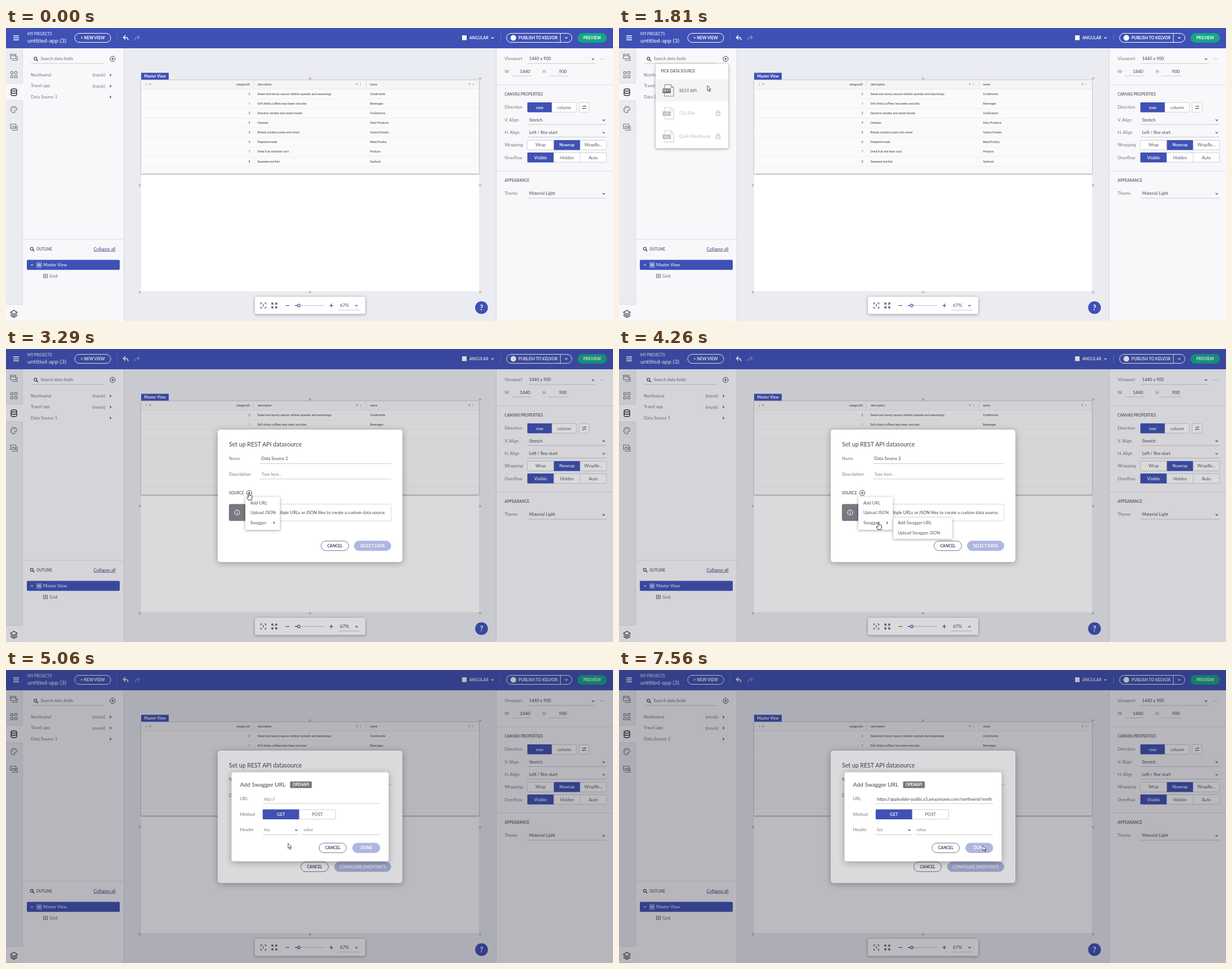
An HTML page that plays this animation: 1078x520 px, repeating every 8 s.

```html
<!DOCTYPE html>
<html lang="en">
<head>
<meta charset="utf-8">
<title>App builder: add a data source</title>
<style>
html, body { margin: 0; width: 100%; height: 100%; overflow: hidden; }
svg { display: block; width: 100%; height: 100%; font-family: Lato, "Open Sans", sans-serif; }
text { white-space: pre; }
.grid { font-family: Roboto, sans-serif; }
.shadow { filter: drop-shadow(0 1px 2.5px rgba(0,0,0,.38)); }
.lift { filter: drop-shadow(0 2px 6px rgba(0,0,0,.3)); }
</style>
</head>
<body>
<svg id="stage" viewBox="0 0 1078 520" preserveAspectRatio="none"></svg>
<script>
const BLUE = '#3f51b5', PALE = '#aeb6e0', INK = '#44454f', GREY = '#77777c', PANEL = '#f8f8fb', EDGE = '#d6d7dc';

// y is the vertical middle of the capitals
const text = (x, y, s, o = {}) => {
  const size = o.size || 7.65;
  return `<text x="${x}" y="${y + size * .36}" font-size="${size}" fill="${o.fill || INK}" font-weight="${o.w || 400}"` +
    ` text-anchor="${o.at || 'start'}"${o.it ? ' font-style="italic"' : ''}${o.more || ''}>${s}</text>`;
};
const box = (x, y, x2, y2, fill, more = '') =>
  `<rect x="${x}" y="${y}" width="${x2 - x}" height="${y2 - y}" fill="${fill}" ${more}/>`;
const path = (d, color = GREY, w = 1, fill = 'none') =>
  `<path d="${d}" fill="${fill}" stroke="${color}" stroke-width="${w}"/>`;
const rule = (x, x2, y, color = '#bdbec5') => path(`M${x} ${y}H${x2}`, color, .8);
const dot = (x, y, r, fill, more = '') => `<circle cx="${x}" cy="${y}" r="${r}" fill="${fill}" ${more}/>`;
const at = (x, y, s) => `<g transform="translate(${x} ${y})">${s}</g>`;
const group = (id, s, more = '') => `<g id="${id}" ${more}>${s}</g>`;
const down = (x, y, c = INK) => path(`M${x - 2} ${y - 1}l2 2 2-2`, c, 1.1);
const right = (x, y, c = INK) => path(`M${x - 1} ${y - 2}l2 2-2 2`, c, 1.1);
const bold = (x, y, s, fill = '#6b6c74', size = 6.7, anchor) => text(x, y, s, { w: 700, fill, size, at: anchor });
const plus = (x, y) => dot(x, y, 4.6, 'none', `stroke="${INK}"`) + path(`M${x - 2.5} ${y}h5M${x} ${y - 2.5}v5`, INK);
const lens = (x, y) => dot(x - .7, y - .7, 2.5, 'none', `stroke="${INK}" stroke-width="1.2"`) +
  path(`M${x + 1.2} ${y + 1.2}l2.6 2.6`, INK, 1.5);
const pill = (x, x2, y, label, solid, h = 17) =>
  box(x, y - h / 2, x2, y + h / 2, solid || '#fff', `rx="${h / 2}" stroke="${solid || '#75767f'}"`) +
  bold((x + x2) / 2, y, label, solid ? '#fff' : '#3c4170', 7, 'middle');
const field = (x, x2, y, hint) => text(x + 2.5, y, hint, { it: 1, fill: '#85868c' }) + rule(x, x2, y + 8.7);

// equal buttons with one chosen
const choice = (x, x2, y, h, labels, chosen) => {
  const w = (x2 - x) / labels.length;
  return box(x, y - h / 2, x2, y + h / 2, '#fff', 'rx="1.5" stroke="#c4c5cd" stroke-width=".8"') +
    labels.map((s, i) => {
      const l = x + w * i, on = i === chosen;
      return (on ? box(l, y - h / 2 - .3, l + w, y + h / 2 + .3, BLUE, 'rx="1"') : '') +
        (i ? path(`M${l} ${y - h / 2}v${h}`, '#c4c5cd', .7) : '') +
        text(l + w / 2, y, s, { at: 'middle', fill: on ? '#fff' : '#5a5b63', w: on ? 600 : 400 });
    }).join('');
};

const header = () => box(0, 0, 1078, 36, BLUE) +
  path('M13 14h10M13 17.5h10M13 21h10', '#fff', 1.3) +
  bold(38, 10.3, 'MY PROJECTS', '#cdd2f0', 6.6) +
  text(38, 22, 'untitled-app (3)', { size: 10.2, fill: '#fff' }) +
  box(122, 9.5, 186, 25.5, 'none', 'rx="8" stroke="#fff"') + bold(154, 17.3, '+ NEW VIEW', '#fff', 7.2, 'middle') +
  path('M197.5 9v16M878.5 9v16', '#6372c4') +
  path('M212 13l-3.5 3.7 3.5 3.7M208.8 16.7h4.5q3.2.5 3.5 5', '#fff', 1.5) +
  path('M233.500 13l3.500 3.700-3.500 3.700M236.700 16.700h-4.500q-3.200.5-3.500 5', '#8490d3', 1.3) +
  box(810, 13, 818, 21.5, '#fff') + text(823, 17.3, 'ANGULAR', { size: 7.1, fill: '#fff', w: 600 }) + down(864, 17.5, '#fff') +
  box(889, 9.5, 1005, 25.5, 'none', 'rx="8" stroke="#fff"') + path('M984.500 10v15.500', '#fff', .9) +
  dot(901, 17.5, 5, '#fff') + bold(910, 17.3, 'PUBLISH TO KELVOR', '#fff', 7.1) + down(995, 17.5, '#fff') +
  box(1015, 9, 1067, 26, '#13a784', 'rx="8.500"') + bold(1041, 17.3, 'PREVIEW', '#fff', 7.1, 'middle');

const rail = () => box(0, 36, 29, 520, '#ebecf1') + path('M29.300 36V520', EDGE) +
  [[98, 129], [490.500, 520]].map(([a, b]) => box(0, a, 30, b, PANEL) + rule(0, 29, a, EDGE) + rule(0, 29, b, EDGE)).join('') +
  at(14, 52, path('M-6-5.500H3.500V2.500H-6ZM-6-2.800H3.500M5.800-2V5.500H-3.500', GREY, 1.2)) +
  at(14, 83, path('M-5.500-5.500h4v4h-4zM-5.500 1.500h4v4h-4zM1.500 1.500h4v4h-4z', GREY, 1.2) + dot(3.5, -3.5, 2.3, 'none', `stroke="${GREY}" stroke-width="1.2"`)) +
  at(14, 114, path('M-5-4V4Q-5 6 0 6T5 4V-4M-5-4Q-5-6 0-6T5-4Q5-2 0-2T-5-4M-5 0Q-4 2 0 2T5 0', '#24252b', 1.3)) +
  at(14, 145, path('M1 5.500A5.600 5.600 0 1 1 5.600-1Q5.500 1.500 2.500 1Q0 1 1.500 3Q2 5 1 5.500Z', GREY, 1.2) +
    [[-3, -.5], [-1.500, -3], [1.500, -3]].map(p => dot(...p, .8, GREY)).join('')) +
  at(14, 176, path('M-6-5.500H3.500V2.500H-6ZM5.800-3V5.500H-3.500M-4 1l2-3 2 2 1-1 2 2', GREY, 1.2)) +
  at(14, 507, path('M-6-2.500L0-6 6-2.500 0 1ZM-6 .5L0 4 6 .5M-6 3.300L0 6.800 6 3.300', '#33343b', 1.2));

const source = (y, name, mock) => text(44, y, name, { fill: '#74757b' }) +
  (mock ? text(176, y + .5, '(mock)', { at: 'end', fill: '#74757b', more: mock }) : '') + right(185.5, y + .5);

const bars = (x, y, c) => [0, 1, 2].map(i =>
  box(x + i * 3, y, x + i * 3 + 2, y + 7.500, c)).join('') + path(`M${x} ${y + 2.500}h8M${x} ${y + 5}h8`, PANEL, .5);

const panel = () => box(30, 36, 209, 520, PANEL) + path('M209.500 36V520', EDGE) +
  lens(53, 55) + text(61.500, 54.500, 'Search data fields', { it: 1, fill: '#75767c', size: 7.9 }) + rule(44, 174, 63) + plus(189.300, 54.700) +
  group('rowHover', box(40, 93.500, 193, 111, '#ededf0') +
    text(137, 103, '(mock)', { fill: '#74757b' }) + [166, 169, 172].map(x => dot(x, 103, 1.100, INK)).join('')) +
  source(83, 'Northwind', ' ') + source(102.500, 'Travel app', ' id="mock"') + source(122, 'Data Source 1') +
  rule(30, 209, 375, EDGE) + lens(46.500, 392.500) + bold(54, 392.500, 'OUTLINE', '#6b6c74', 6.5) +
  text(194.500, 392, 'Collapse all', { at: 'end', size: 7.9, fill: '#3a4478', more: ' text-decoration="underline"' }) +
  box(37, 411.500, 202, 429.300, BLUE, 'rx="2"') + down(46, 420.500, '#c6ccef') +
  box(54.500, 416, 63, 425, 'none', 'stroke="#aab3e6" stroke-width=".7"') + path('M56.500 417.500v6M58.800 417.500v6M61 417.500v6', '#fff', 1.200) +
  text(66, 420.500, 'Master View', { fill: '#fff' }) +
  bars(66, 436.300, '#85868c') + text(77, 440, 'Grid', { fill: '#5f6067' });

const rows = [
  [2, 'Sweet and savory sauces relishes spreads and seasonings', 'Condiments'],
  [1, 'Soft drinks coffees teas beers and ales', 'Beverages'],
  [3, 'Desserts candies and sweet breads', 'Confections'],
  [4, 'Cheeses', 'Dairy Products'],
  [5, 'Breads crackers pasta and cereal', 'Grains/Cereals'],
  [6, 'Prepared meals', 'Meat/Poultry'],
  [7, 'Dried fruit and bean curd', 'Produce'],
  [8, 'Seaweed and fish', 'Seafood']];
const cell = (x, y, s, anchor) => text(x, y, s, { size: 5.050, at: anchor, fill: '#3c3c40' });
const dots = x => [-1.600, 0, 1.600].map(d => dot(x, 100 + d, .5, GREY)).join('');
const arrowUp = x => path(`M${x} 102v-4M${x - 1.800} 99.800l1.800-1.800 1.800 1.800`, GREY, .6);

const canvas = () => box(210, 36, 870, 520, '#ebecf1') + box(240, 92, 840, 467, '#fff') +
  box(240, 92, 840, 258.500, '#fafafa', 'style="filter:drop-shadow(0 1px 1px rgba(0,0,0,.45))"') +
  box(240, 92, 840, 108.500, '#f5f5f6') +
  `<g class="grid">` + cell(433, 100.300, 'categoryID', 'end') + cell(447, 100.300, 'description') + cell(646.500, 100.300, 'name') +
  rows.map(([id, about, name], i) => {
    const y = 117.200 + i * 17.070;
    return cell(433.500, y, id, 'end') + cell(446.500, y, about) + cell(646.500, y, name) + rule(240, 840, y + 8.500, '#eeeeef');
  }).join('') + `</g>` + path('M439.500 92v16.500M639.500 92v16.500', '#dcdcdf', .8) + rule(240, 840, 108.500, '#e6e6e8') +
  dots(249.500) + arrowUp(256) + arrowUp(623) + dots(629.500) + arrowUp(823) + dots(829.500) +
  box(240, 79.500, 289, 92, BLUE) + bold(264.500, 85.700, 'Master View', '#fff', 6.900, 'middle') + rule(240, 840, 92, '#b9bfdf') +
  [[540, 89.500], [842, 89.500], [237.500, 279], [842, 279], [237.500, 469], [540, 469], [842, 469]].map(([x, y]) =>
    box(x - 1.200, y - 1.200, x + 1.200, y + 1.200, '#fff', 'stroke="#80818a" stroke-width=".7"')).join('') +
  box(442, 477, 638, 507.500, '#fff', 'rx="3" class="shadow"') +
  at(457, 492.500, path('M-4.500-2V-4.500H-2M2-4.500H4.500V-2M4.500 2V4.500H2M-2 4.500H-4.500V2M0-2V2M-1-1.200L0-2', INK, 1.100)) +
  at(476.500, 492.500, path('M-4.500-1.500V-4.500H-1.500M1.500-4.500H4.500V-1.500M4.500 1.500V4.500H1.500M-1.500 4.500H-4.500V1.500M-4-4l2.500 2.500M4-4L1.500-1.500M4 4L1.500 1.500M-4 4l2.500-2.500', INK, 1.100)) +
  path('M496.500 492.500h6.500M574.500 492.500h6.500M577.700 489.300v6.500', INK, 1.200) +
  path('M520 492.500h45', '#bfc1ca') + path('M513 492.500h6', BLUE, 1.400) + dot(520, 492.500, 2.300, '#fff', `stroke="${BLUE}" stroke-width="1.200"`) +
  text(593, 492.500, '67%', { size: 8.300 }) + down(622.500, 492.700) + rule(590, 628, 500.500) +
  dot(844.500, 496.300, 11.300, BLUE) + bold(844.500, 496.500, '?', '#fff', 13, 'middle');

const label = (y, s) => text(885.500, y, s, { fill: GREY });
const select = (y, name, s, x2 = 1066.500) => label(y, name) + text(929, y, s) + rule(926, x2, y + 8.300) + down(x2 - 5, y + .5);

const inspector = () => box(870, 36, 1078, 520, PANEL) + path('M870.500 36V520', EDGE) +
  select(54.700, 'Viewport', '1440 x 900', 1047.500) + [1056.500, 1059.500, 1062.500].map(x => dot(x, 55, .8, '#a9aab0')).join('') +
  label(77, 'W') + text(931, 77, '1440', { at: 'end', size: 8 }) + rule(899, 933, 85) +
  text(953, 77, 'H', { fill: GREY }) + text(996, 77, '900', { at: 'end', size: 8 }) + rule(963, 999, 85) +
  rule(871, 1078, 100.800, EDGE) + bold(885.500, 117.300, 'CANVAS PROPERTIES') +
  label(140.500, 'Direction') + choice(926, 1013, 140.800, 17, ['row', 'column'], 0) +
  box(1018, 132.300, 1035.500, 149.300, '#fff', 'rx="1.500" stroke="#c4c5cd" stroke-width=".8"') +
  path('M1023.500 139h6.500l-1.800-1.800M1030.500 142.500h-6.500l1.800 1.800', INK) +
  select(163, 'V. Align', 'Stretch') + select(185.300, 'H. Align', 'Left / flex-start') +
  label(207.500, 'Wrapping') + choice(926, 1066.500, 207.700, 17, ['Wrap', 'Nowrap', 'WrapRe...'], 1) +
  label(230, 'Overflow') + choice(926, 1066.500, 229.800, 17, ['Visible', 'Hidden', 'Auto'], 0) +
  rule(871, 1078, 253.700, EDGE) + bold(885.500, 271, 'APPEARANCE') + select(293.700, 'Theme', 'Material Light');

const fileItem = (y, tag, name, locked) => `<g opacity="${locked ? .42 : 1}">` + at(88, y,
  path('M-7-3.500V-10.500H4L9-5.500V10H-7V5.500M4-10.500V-5.500H9', '#85868c', 1) + box(-10.500, -3.500, 4, 4.500, '#62636b') +
  bold(-3.300, .5, tag, '#fff', 5.300, 'middle')) + text(107, y, name, { fill: '#5f6067' }) +
  (locked ? box(172.800, y - 1.500, 179.200, y + 4, 'none', `stroke="${INK}" rx=".5"`) + path(`M174 ${y - 1.500}v-1.500a2 2 0 0 1 4 0v1.500`, INK) + dot(176, y + 1.200, .7, INK) : '') + `</g>`;
const picker = () => box(65, 63.500, 194, 213.500, '#fff', 'class="shadow"') + bold(74.500, 76.800, 'PICK DATA SOURCE', '#6b6c74', 6.550) +
  box(65, 91, 194, 130.500, '#f4f4f5') + fileItem(111, 'REST', 'REST API') +
  fileItem(151.500, 'CSV', 'CSV File', 1) + fileItem(192.500, 'XLS', 'Quiln Workbook', 1);

const setup = () => box(376, 143, 704, 378, '#fff', 'rx="5" class="lift"') +
  text(396, 169.500, 'Set up REST API datasource', { size: 10.600 }) +
  text(396, 194.500, 'Name', { fill: GREY }) + text(453.500, 194.500, 'Data Source 2') + rule(451, 684, 203.500) +
  text(396, 222, 'Description', { fill: GREY }) + field(451, 684, 222, 'Type here...') +
  group('sources', bold(396, 255.500, 'SOURCE') + plus(432, 255.500) +
    box(396, 275.300, 684, 305, '#fff', 'rx="2.500" stroke="#d2d3d9" stroke-width=".9"') +
    path('M398.500 275.300H425.500V305H398.500Q396 305 396 302.500V278Q396 275.300 398.500 275.300Z', 'none', 0, '#777881') +
    dot(410.500, 290.200, 4.500, 'none', 'stroke="#fff" stroke-width="1.100"') + path('M410.500 289.700v3M410.500 287.500v1.200', '#fff', 1.100) +
    text(433, 290, 'You can add multiple URLs or JSON files to create a custom data source.') +
    pill(559.500, 608.500, 349.300, 'CANCEL') + pill(618.500, 683.500, 349.300, 'SELECT DATA', PALE)) +
  group('endpoints', pill(523.500, 572.500, 349.300, 'CANCEL') + pill(583.500, 683.500, 349.300, 'CONFIGURE ENDPOINTS', PALE));

const menu = () => box(425, 262.500, 486.500, 321, '#fff', 'class="shadow"') +
  ['Add URL', 'Upload JSON', 'Swagger'].map((s, i) => text(434, 273 + i * 17.600, s, { fill: '#55565e' })).join('') + right(476, 308.300);
const submenu = () => box(487, 299.500, 592, 337, '#fff', 'class="shadow"') +
  text(495, 308.300, 'Add Swagger URL', { fill: '#55565e' }) + text(495, 326, 'Upload Swagger JSON', { fill: '#55565e' });

const urlDialog = () => box(400.500, 181.500, 679.500, 339.500, '#fff', 'rx="4" class="lift"') +
  text(415.500, 203.500, 'Add Swagger URL', { size: 10.300 }) + box(504.500, 197.800, 543, 209.500, '#74757e', 'rx="1.500"') +
  bold(523.700, 203.600, 'OPENAPI', '#fff', 6.700, 'middle') +
  [['URL', 228.700], ['Method', 256], ['Header', 283.500]].map(([s, y]) => text(415.500, y, s, { fill: GREY })).join('') +
  group('hint', text(458, 229, 'http://', { it: 1, fill: '#85868c' })) + rule(456, 664.500, 237) +
  group('focus', path('M456 237h208.500', BLUE, 1.400)) +
  `<clipPath id="clip">${box(456, 220, 663, 236, '#000')}</clipPath>` +
  group('url', text(458, 229, 'https://appbuilder-public.s3.amazonaws.com/northwind/north', { size: 7.500 }), 'clip-path="url(#clip)"') +
  choice(456, 585.500, 256.200, 17, ['GET', 'POST'], 0) +
  field(456, 521, 283.500, 'key') + down(515.500, 284.200) + field(526, 664.500, 283.500, 'value') +
  pill(556, 604.500, 315.700, 'CANCEL') + pill(615.500, 664, 315.700, 'DONE', PALE) + group('ready', pill(615.500, 664, 315.700, 'DONE', BLUE));

const shade = id => group(id, box(0, 0, 1078, 520, '#1c1d28', 'opacity=".16"'));
const pointer = () => group('arrow', path('M0 0V9.200L2.100 7.400 3.700 11 5.100 10.400 3.500 7H6.200Z', '#222', .8, '#fff')) +
  group('hand', path('M-1 .8Q0-.5 1 .8V5Q4 4.800 5.500 6.300V10L4.500 13.500H-1.200L-4 9Q-3.600 7.400-1 8.800Z', '#222', .9, '#fff')) +
  group('beam', path('M-1.500-4.500H1.500M0-4.500V4.500M-1.500 4.500H1.500', '#222', .9));

stage.innerHTML = canvas() + inspector() + panel() + rail() + header() + group('picker', picker()) + shade('dim') +
  group('setup', setup()) + group('menu', menu()) + group('submenu', submenu()) +
  shade('dimMore') + group('urlDialog', urlDialog()) + group('pointer', pointer());

// pointer stops: time, x, y
const stops = [[90, 833, 403], [790, 189, 55], [1200, 189, 55], [1330, 214, 76], [1490, 122, 100], [1620, 157, 102],
  [2190, 157, 102], [2780, 444, 248], [2990, 431.500, 254.500], [3290, 431.500, 254.500], [3820, 461, 307], [4260, 461, 307],
  [4590, 501, 307.500], [5350, 501, 307.500], [5940, 503, 229], [6570, 503, 229], [7020, 646, 311.500], [8000, 646, 311.500]];

const $ = id => document.getElementById(id);
const show = (id, on) => $(id).setAttribute('visibility', on ? 'visible' : 'hidden');

function draw(t) {
  const during = (a, b = 8000) => t >= a && t < b;
  const i = Math.max(1, stops.findIndex(s => t < s[0]));
  const [t0, x0, y0] = stops[i - 1], [t1, x1, y1] = stops[i];
  const u = Math.min(1, Math.max(0, (t - t0) / (t1 - t0))), e = u * u * (3 - 2 * u);
  $('pointer').setAttribute('transform', `translate(${x0 + (x1 - x0) * e} ${y0 + (y1 - y0) * e})`);
  const hand = during(750, 1240) || during(1420, 1780) || during(2940, 5010) || during(6940, 7560);
  const beam = during(5880, 6630);
  show('hand', hand);
  show('beam', beam);
  show('arrow', t >= 90 && !hand && !beam);

  const hover = during(1900, 2270);
  show('rowHover', hover);
  show('mock', !hover);
  show('picker', during(960, 1900));
  $('picker').setAttribute('opacity', Math.min(1, .35 + (t - 960) / 120));
  const added = t >= 5010;
  show('dim', t >= 1900);
  $('setup').style.display = t >= 1900 ? '' : 'none';
  show('sources', !added);
  show('endpoints', added);
  show('menu', during(3090, 5010));
  show('submenu', during(3700, 5010));
  show('dimMore', t >= 5060);
  $('urlDialog').style.display = added ? '' : 'none';
  show('focus', during(5940, 7380));
  show('hint', t < 6320);
  show('url', t >= 6320);
  show('ready', during(6320, 7560));
}

let start;
function tick(now) {
  start ??= now;
  draw((now - start) % 8000);
  requestAnimationFrame(tick);
}
draw(0);
requestAnimationFrame(tick);
</script>
</body>
</html>
```
